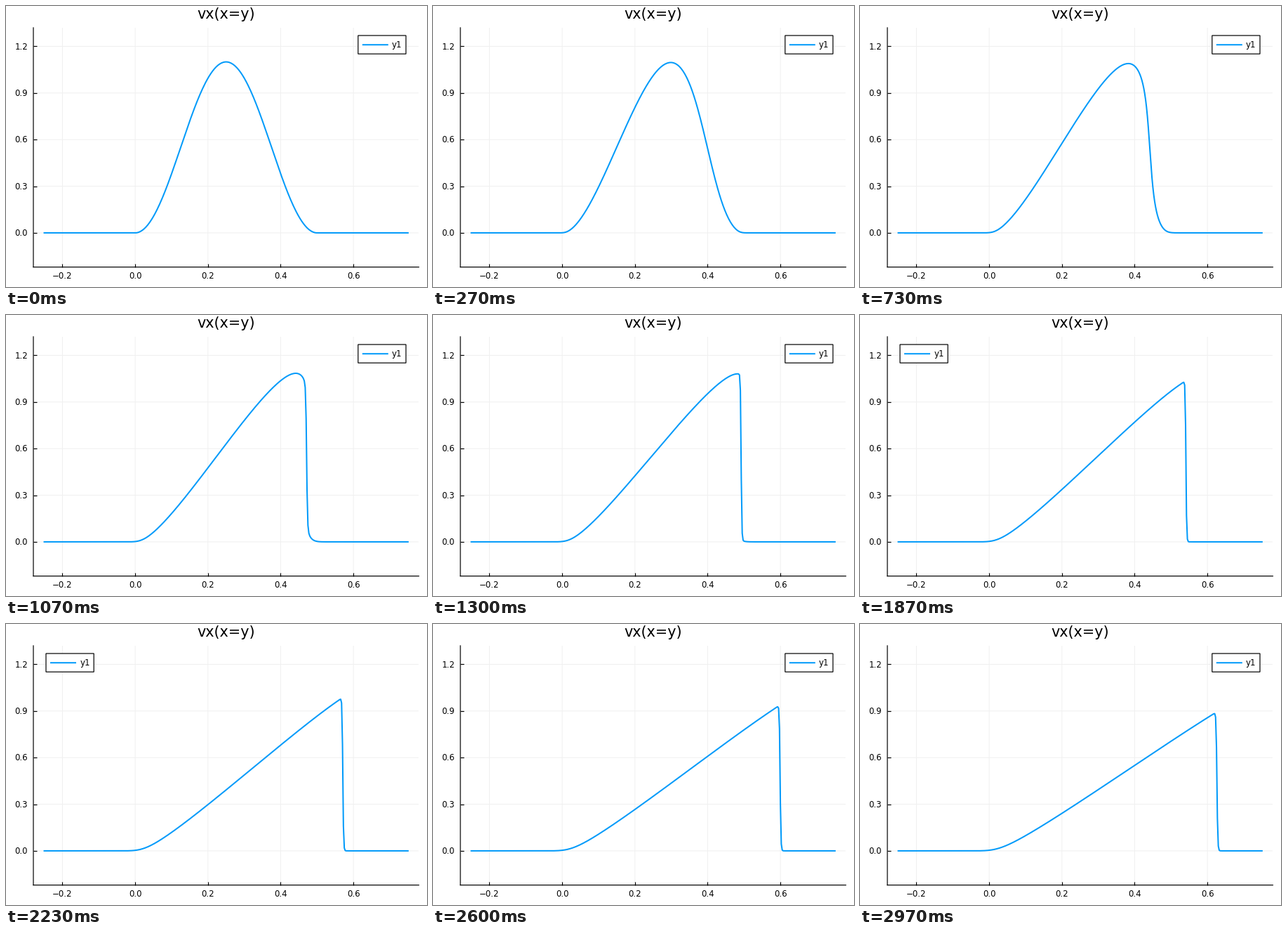
These frames come from a looping animation (600 px wide and 400 px high, 3010 ms). A matplotlib script:

```python
import numpy as np
import matplotlib.pyplot as plt
from matplotlib.animation import FuncAnimation
from matplotlib.patches import Rectangle

W, H, DPI = 600, 400, 100
PX = 72 / DPI
BLUE = "#009AFA"
STEPS, DT, SUBSTEPS = 90, 1 / 180, 10
CELL, NU = 1 / 400, 0.001
TICK_MS, LOOP_MS = 10, 3010

plt.rcParams["font.family"] = "DejaVu Sans"
plt.rcParams["path.snap"] = False


def rate(u):
    """Time derivative of vx; vy is its mirror image across x = y."""
    p = np.pad(u, 2)
    e, w, ww = p[3:-1, 2:-2], p[1:-3, 2:-2], p[:-4, 2:-2]
    n, s, ss = p[2:-2, 3:-1], p[2:-2, 1:-3], p[2:-2, :-4]
    # third-order upwind slopes
    ux = (2 * e + 3 * u - 6 * w + ww) / (6 * CELL)
    uy = (2 * n + 3 * u - 6 * s + ss) / (6 * CELL)
    laplace = (e + w + n + s - 4 * u) / CELL ** 2
    return NU * laplace - u * ux - u.T * uy


def solve():
    """Viscous Burgers flow in the plane, sampled on the diagonal x = y."""
    s = np.arange(-40, 281) * CELL
    wave = np.where((s > 0) & (s < 0.5), np.sin(2 * np.pi * s), 0)
    u = (1.1 * np.outer(wave, wave)).astype(np.float32)
    dt = DT / SUBSTEPS
    diagonals = [np.pad(u.diagonal(), (60, 20))]
    for _ in range(STEPS - 1):
        for _ in range(SUBSTEPS):
            k1 = rate(u)
            k2 = rate(u + dt * k1)
            u = u + dt / 2 * (k1 + k2)
        diagonals.append(np.pad(u.diagonal(), (60, 20)))
    return np.arange(-100, 301) * CELL, diagonals


x, states = solve()

fig = plt.figure(figsize=(W / DPI, H / DPI), dpi=DPI, facecolor="white")

# Plot area in pixels: left, top, right, bottom
L, T, R, B = 39, 30.9, 588.4, 371.6
ax = fig.add_axes([L / W, 1 - B / H, (R - L) / W, (B - T) / H])
ax.set(xlim=(-0.28, 0.78), ylim=(-0.22, 1.32))
xticks = [-0.2, 0, 0.2, 0.4, 0.6]
yticks = [0, 0.3, 0.6, 0.9, 1.2]
ax.set_xticks(xticks)
ax.set_yticks(yticks)
ax.tick_params(direction="in", length=5 * PX, width=1.2 * PX,
               labelbottom=False, labelleft=False)
ax.grid(color="#f0f0f0", lw=1 * PX)
ax.set_axisbelow(True)
ax.spines[["top", "right"]].set_visible(False)
ax.spines[["left", "bottom"]].set_linewidth(1.2 * PX)
curve, = ax.plot(x, states[0], color=BLUE, lw=2 * PX)

# Overlay with pixel coordinates for text and legends
ui = fig.add_axes([0, 0, 1, 1])
ui.set(xlim=(0, W), ylim=(H, 0))
ui.axis("off")


def label(px, py, text, size=11.7, ha="center"):
    return ui.text(px, py, text, fontsize=size * PX, ha=ha, va="baseline")


def number(v):
    return f"{v:.1f}".replace("-", "\u2212")


def legend(left):
    box = Rectangle((left, 42), 68.2, 26.2, fc="white", ec="black",
                    lw=1.2 * PX)
    ui.add_patch(box)
    key, = ui.plot([left + 6, left + 43], [55.2, 55.2], color=BLUE, lw=2 * PX,
                   solid_capstyle="butt")
    return box, key, label(left + 48.3, 59.5, "y1", ha="left")


label(314, 18, "vx(x=y)", 20.8)
for v in xticks:
    label(L + (v + 0.28) / 1.06 * (R - L), 388, number(v))
for v in yticks:
    label(31, B - (v + 0.22) / 1.54 * (B - T) + 4.3, number(v), ha="right")

right_legend = legend(501.8)
left_legend = legend(57)


def draw(tick):
    # 30 steps per second, rounded to hundredths
    k = min(int(0.3 * tick + 0.15), STEPS - 1)
    curve.set_ydata(states[k])
    # the legend avoids the crest while it is in the top right corner
    on_left = 48 <= k < 77
    for artist in left_legend:
        artist.set_visible(on_left)
    for artist in right_legend:
        artist.set_visible(not on_left)
    return (curve, *left_legend, *right_legend)


anim = FuncAnimation(fig, draw, frames=LOOP_MS // TICK_MS, interval=TICK_MS,
                     repeat=True, repeat_delay=0)
plt.show()
```
